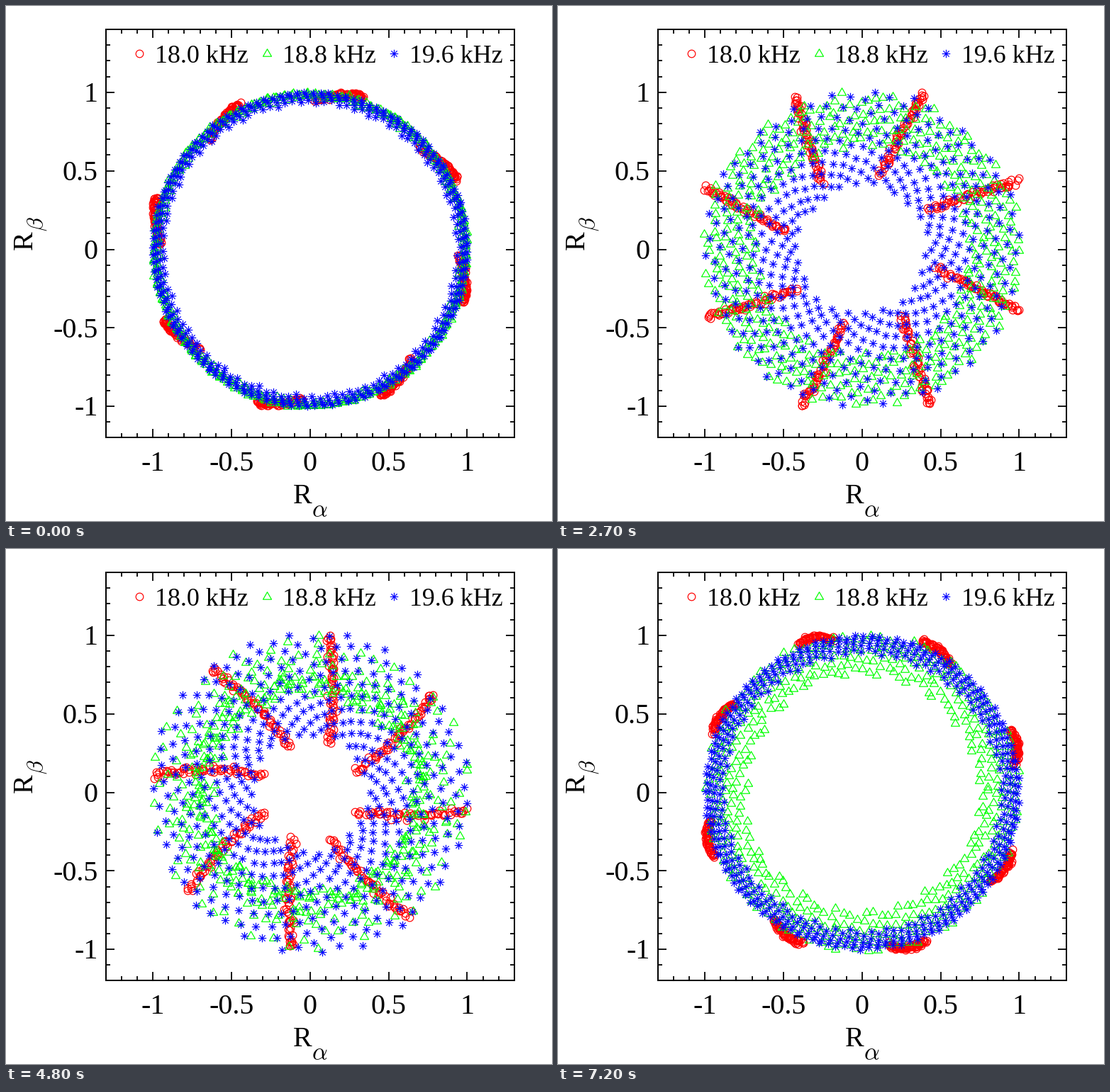
A matplotlib script that plays this animation: 770x727 px, repeating every 7300 ms.

```python
import matplotlib.pyplot as plt
import numpy as np
from matplotlib.animation import FuncAnimation
from matplotlib.path import Path

W, H, DPI = 770, 727, 100
FRAMES, STEP_MS = 73, 100
PT = 72 / DPI                       # points per pixel
X0, Y0, UNIT = 428.7, 343.5, 221.7  # plot origin and pixels per unit
LEFT, RIGHT, TOP, BOTTOM = 140.5, 717, 33, 609
RED, GREEN, BLUE = "#ff0000", "#00ff00", "#0000ff"

# Each frame shows a 10 ms window of the signals; it slides 1 ms per frame.
RATE, WINDOW = 48, 480              # samples per ms, samples per window
time = np.arange(RATE * FRAMES + WINDOW) / RATE
rng = np.random.default_rng(7)


def signal(khz, null, quarter, floor, drift, noise):
    """Rotating vector whose slow beat nearly vanishes at `null` ms.

    `quarter` is the time from peak to null, `floor` the part that remains
    there, `drift` the slow phase in degrees.
    """
    beat = np.sin(np.pi / 2 * (null - time) / quarter) + 1j * floor
    slow = beat * np.exp(1j * np.radians(drift))
    slow += noise * (rng.normal(size=time.size) + 1j * rng.normal(size=time.size))
    return slow * np.exp(2j * np.pi * khz * time)


red_drift = 13 + .0085 * time ** 2 + 28 * np.exp(-time / 10)
signals = [
    signal(18.0, 44, 35, .03, red_drift, .007),
    signal(18.8, 52, 50, .16, .2 * time, .006),
    signal(19.6, 43, 44, .04, -.2 * time, .002),
]


def to_px(z):
    """Scale each axis so its largest value is one, then map to pixels."""
    return X0 + UNIT * z.real / z.real.max(), Y0 - UNIT * z.imag / z.imag.max()


fig = plt.figure(figsize=(W / DPI, H / DPI), dpi=DPI, facecolor="white")
ax = fig.add_axes([0, 0, 1, 1])
ax.set_xlim(0, W)
ax.set_ylim(H, 0)
ax.axis("off")


def line(xs, ys, width=1.8):
    ax.plot(xs, ys, color="black", lw=width * PT, solid_capstyle="butt",
            solid_joinstyle="miter", zorder=5)


def label(x, y, text, size=40, **kw):
    ax.text(x, y, text, fontsize=size * PT, family="Liberation Serif",
            va="baseline", **kw)


def frame_and_ticks():
    line([LEFT, RIGHT, RIGHT, LEFT, LEFT, RIGHT],
         [TOP, TOP, BOTTOM, BOTTOM, TOP, TOP], 2)
    for k in range(-12, 14):
        size = 12 if k % 5 == 0 else 6
        x, y = X0 + UNIT * k / 10, Y0 - UNIT * k / 10
        if k < 13:
            line([x, x], [TOP, TOP + size])
            line([x, x], [BOTTOM, BOTTOM - size])
        if k > -12:
            line([LEFT, LEFT + size], [y, y])
            line([RIGHT, RIGHT - size], [y, y])
        if k % 5 == 0:
            text = f"{k / 10:g}"
            label(x, 656, text, ha="center")
            label(129.5, y + 13.3, text, ha="right")


def axis_titles():
    label(404.5, 702, "R")
    label(431, 721, r"$\alpha$", 34, math_fontfamily="cm")
    turned = dict(rotation=90, rotation_mode="anchor")
    label(37, 343.5, "R", **turned)
    label(52, 317.5, r"$\beta$", 32, math_fontfamily="cm", **turned)


triangle = Path([(0, 1.12), (-1, -.62), (1, -.62), (0, 1.12)],
                [Path.MOVETO, Path.LINETO, Path.LINETO, Path.CLOSEPOLY])
star = Path([(-1, 0), (1, 0), (0, -1), (0, 1),
             (-.72, -.72), (.72, .72), (-.72, .72), (.72, -.72)],
            [Path.MOVETO, Path.LINETO] * 4)


def series(marker, size, color, key_x, text):
    """Draw a legend entry and return the empty plot for its points."""
    style = dict(ls="none", marker=marker, ms=size * PT, mec=color,
                 mfc="none", mew=1.2 * PT)
    ax.plot([key_x], [66.5], **style)
    label(key_x + 22, 80, text, 36)
    return ax.plot([], [], zorder=3, **style)[0]


frame_and_ticks()
axis_titles()
plots = [
    series("o", 10.6, RED, 188, "18.0 kHz"),
    series(triangle, 13.4, GREEN, 368, "18.8 kHz"),
    series(star, 11.5, BLUE, 547, "19.6 kHz"),
]


def draw(i):
    window = slice(RATE * i, RATE * i + WINDOW)
    for plot, z in zip(plots, signals):
        plot.set_data(*to_px(z[window]))
    return plots


anim = FuncAnimation(fig, draw, frames=FRAMES, interval=STEP_MS,
                     repeat=True, repeat_delay=0)
plt.show()
```
